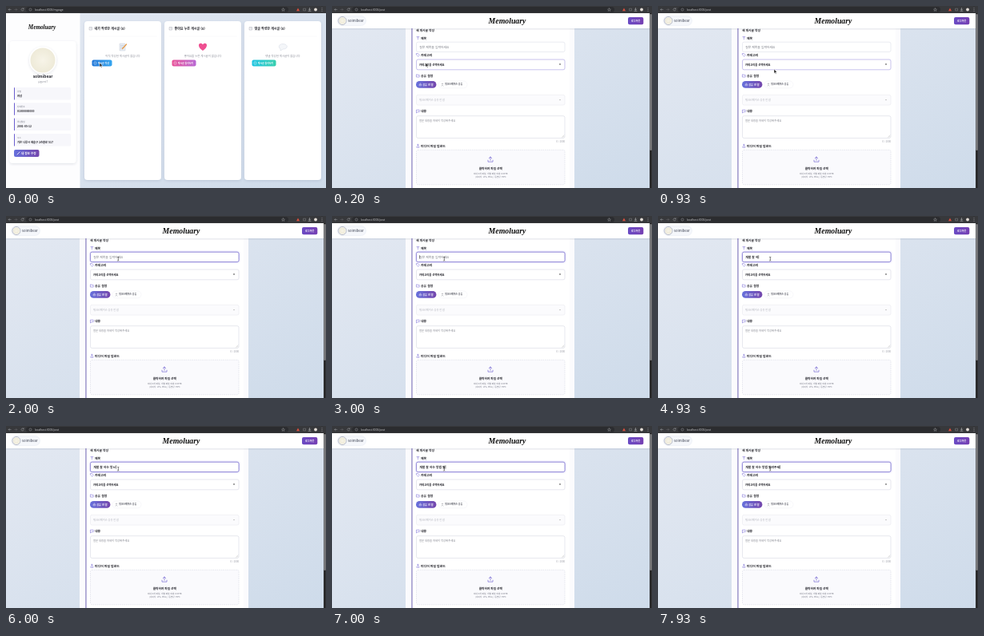
Recreate the animation shown at these times as an HTML page. Size 400x228 px, loop 8 s.

```html
<!DOCTYPE html>
<html lang="ko">
<head>
<meta charset="utf-8">
<title>새 게시글 작성</title>
<style>
  html, body { margin: 0; width: 100%; height: 100%; overflow: hidden; background: #fff; }
  svg { display: block; width: 100vw; height: 100vh; }
  text { font-family: "Noto Sans CJK KR", "Noto Sans CJK", "Noto Sans", sans-serif; white-space: pre; }
  .url { font-family: "Open Sans", "Noto Sans", sans-serif; }
  .brand { font-family: "Liberation Serif", serif; font-style: italic; }
</style>
</head>
<body>
<svg id="stage" viewBox="0 0 400 228" preserveAspectRatio="none">
  <defs>
    <linearGradient id="sky" x1="0" y1="0" x2="1" y2="1">
      <stop stop-color="#e4e9f2"/><stop offset=".5" stop-color="#d9e2ee"/><stop offset="1" stop-color="#cedbea"/>
    </linearGradient>
    <linearGradient id="violet"><stop stop-color="#6670dc"/><stop offset="1" stop-color="#7446ac"/></linearGradient>
    <linearGradient id="plum"><stop stop-color="#6a4bc4"/><stop offset="1" stop-color="#753fb2"/></linearGradient>
    <linearGradient id="blue"><stop stop-color="#2277d8"/><stop offset="1" stop-color="#36a5ef"/></linearGradient>
    <linearGradient id="pink"><stop stop-color="#e95298"/><stop offset="1" stop-color="#b869d4"/></linearGradient>
    <linearGradient id="teal"><stop stop-color="#20c5e3"/><stop offset="1" stop-color="#38cfae"/></linearGradient>
    <radialGradient id="photo"><stop stop-color="#f7f4e8"/><stop offset="1" stop-color="#eeead8"/></radialGradient>
    <filter id="soft" x="-10%" y="-10%" width="120%" height="120%">
      <feDropShadow dx="0" dy="1" stdDeviation="1.5" flood-color="#45506e" flood-opacity=".16"/>
    </filter>
  </defs>
  <g id="home"></g>
  <g id="post"></g>
  <g id="bar"></g>
  <path id="arrow" d="M0 0V5.4L1.3 4.3L2.1 6.2L3 5.8L2.2 4H3.8Z" fill="#222" stroke="#fff" stroke-width=".5"/>
  <path id="beam" d="M-1 -2.4Q0 -2.4 0 -1.8Q0 -2.4 1 -2.4M0 -1.8V1.8M-1 2.4Q0 2.4 0 1.8Q0 2.4 1 2.4" fill="none" stroke="#222" stroke-width=".6"/>
</svg>
<script>
const LOOP = 8000, OPEN = 70, FOCUS = 1430, TYPE = 3350;
const $ = id => document.getElementById(id);
const INK = '#202028', GREY = '#8b8d98', VIOLET = '#6c5fd0';

const rect = (x, y, w, h, fill, r = 0, extra = '') =>
  `<rect x="${x}" y="${y}" width="${w}" height="${h}" rx="${r}" fill="${fill}" ${extra}/>`;
const text = (s, x, y, size, fill = INK, weight = 400, extra = '') =>
  `<text x="${x}" y="${y + size * .36}" font-size="${size}" fill="${fill}" font-weight="${weight}" ${extra}>${s}</text>`;
const line = (d, stroke = VIOLET, w = .6) =>
  `<path d="${d}" fill="none" stroke="${stroke}" stroke-width="${w}" stroke-linecap="round" stroke-linejoin="round"/>`;
const dot = (x, y, r, fill, extra = '') => `<circle cx="${x}" cy="${y}" r="${r}" fill="${fill}" ${extra}/>`;
const MID = 'text-anchor="middle"';
const SHADOW = 'filter="url(#soft)"';
const edge = (color, w = .5) => `stroke="${color}" stroke-width="${w}"`;
const brand = (x, y, size) => text('Memoluary', x, y, size, '#111', 700, MID + ' class="brand"');

function drawBar() {
  $('bar').innerHTML =
    rect(0, 0, 400, 9, '#37383b') + rect(25, 1, 328, 7, '#2b2c2f', 3.5) +
    line('M6.2 4.5H3.2M4.5 3.2L3.2 4.5L4.5 5.8', '#a9abae', .45) +
    line('M10.8 4.5H13.8M12.5 3.2L13.8 4.5L12.5 5.8', '#6b6d71', .45) +
    line('M22 3.5A1.6 1.6 0 1 0 22.2 5M22.2 2.6V3.6H21.2', '#a9abae', .45) +
    dot(30.5, 4.5, 1.5, 'none', edge('#a9abae', .45)) +
    text('', 36, 4.4, 3.3, '#d0d1d4', 400, 'class="url" id="url"') +
    line('M346.5 2.8L347.1 4.1L348.5 4.2L347.4 5.1L347.8 6.4L346.5 5.7L345.2 6.4L345.6 5.1L344.5 4.2L345.9 4.1Z', '#a9abae', .4) +
    '<path d="M365 2.6L367 6.2H363Z" fill="#d8503f"/>' +
    line('M372 3.2H374.6V5.8H372Z', '#8f9195', .45) +
    line('M379.5 2.5V5M378.3 4L379.5 5.2L380.7 4M378 6.3H381', '#c9cacc', .5) +
    dot(387, 4.5, 1.9, '#e3dcd6') +
    [2.8, 4.5, 6.2].map(y => dot(395, y, .45, '#c9cacc')).join('');
}

function infoRow([label, value], i) {
  const y = 102 + i * 19.3;
  return rect(10, y, 71, 15.5, '#f7f7fb', 1.5) + rect(10, y, 1, 15.5, VIOLET, .5) +
    text(label, 14, y + 4.7, 2.6, '#777986', 500) + text(value, 14, y + 10.7, 3.3, INK, 600);
}

function listCard([title, empty, button, fill, w], i) {
  const x = 98 + i * 100;
  return rect(x, 19, 96, 199, '#fff', 4, SHADOW) +
    line(`M${x + 6.5} 26.5H${x + 9.5}V30H${x + 6.5}ZM${x + 7.3} 28H${x + 8.7}`, '#9a9cab', .45) +
    text(title + ' (0)', x + 12.5, 28.3, 4, INK, 700) +
    line(`M${x + 6} 38H${x + 90}`, '#ececf2', .4) +
    text(empty, x + 48, 62.6, 3.4, GREY, 400, MID) +
    rect(x + 9.5, 67.5, w, 8, fill, 2) +
    line(`M${x + 12.5} 70H${x + 14.8}V73H${x + 12.5}Z`, '#fff', .4) +
    text(button, x + 16.8, 71.5, 2.9, '#fff', 600);
}

function drawHome() {
  const rows = [['성별', '여성'], ['전화번호', '01000000000'], ['생년월일', '2001-05-12'],
    ['주소', '가온 나루시 해솔구 2순환로 517']];
  const cards = [
    ['내가 작성한 게시글', '아직 작성한 게시글이 없습니다', '게시글 작성', 'url(#blue)', 25],
    ['좋아요 누른 게시글', '좋아요를 누른 게시글이 없습니다', '게시글 둘러보기', 'url(#pink)', 30],
    ['댓글 작성한 게시글', '댓글 작성한 게시글이 없습니다', '게시글 둘러보기', 'url(#teal)', 30]];
  $('home').innerHTML = rect(0, 0, 400, 228, 'url(#sky)') + rect(0, 9, 92.5, 219, '#fdfdfe') +
    brand(45, 26, 7.2) +
    rect(4.5, 44, 83, 153, '#fff', 4, SHADOW) +
    dot(46, 68, 17, '#fff', SHADOW) + dot(46, 68, 15.5, 'url(#photo)') +
    text('solmibear', 46, 88.2, 5, INK, 700, MID) + text('@guest7', 46, 94.5, 3, GREY, 400, MID) +
    rows.map(infoRow).join('') +
    rect(10, 180, 31.5, 9, 'url(#violet)', 2) + line('M14 186L17 183', '#fff', .8) +
    text('내 정보 수정', 19, 184.5, 3.6, '#fff', 600) +
    cards.map(listCard).join('') +
    // memo, heart and speech bubble
    rect(142, 47, 7, 9, '#e9edf3', .6, edge('#b9c2cf', .4)) +
    line('M143.5 49.5H147.5M143.5 51.5H147.5M143.5 53.5H146', '#9cabc0', .4) +
    line('M145.5 53.5L150.5 48', '#e79a45', 1.2) +
    '<path d="M246 56C237 50 242 43.8 246 48.2C250 43.8 255 50 246 56Z" fill="#ef4f91"/>' +
    '<path d="M346 47.5C353 47.5 353 54 346.5 54L343 56V53.6C339.8 52 341 47.5 346 47.5Z" fill="#f4f6f9" stroke="#d3d9e2" stroke-width=".5"/>';
}

const field = (y, h, fill = '#fff', extra = '') => rect(105.5, y, 185.5, h, fill, 2, extra);
const label = (s, y, icon) => line(icon, VIOLET, .5) + text(s, 111, y, 3.9, INK, 700);
const chevron = (y, color) => `<path d="M283.8 ${y - .7}H286.2L285 ${y + .9}Z" fill="${color}"/>`;

function drawPost() {
  $('post').innerHTML = rect(0, 0, 400, 228, 'url(#sky)') +
    rect(92, 28, 211, 200, '#fbfbfd') +
    rect(99.5, 28, 197.5, 200, '#fff') + rect(99.4, 28, 1.1, 200, '#7a6fb8') +
    text('새 게시글 작성', 105, 30.6, 3.8, INK, 700) +
    label('제목', 40.2, 'M105.8 38.7H109M107.4 38.7V41.8') +
    field(45.2, 12.3, '#fff', 'id="titleBox"') +
    text('', 109.3, 51.4, 3.8, INK, 400, 'id="title"') + rect(0, 49.2, .5, 4.4, '#111', 0, 'id="caret"') +
    label('카테고리', 61.2, 'M105.7 59.6H107.5L109.4 61.5L107.7 63.2L105.7 61.3Z') +
    field(67, 12.8, '#fff', 'id="select"') + text('카테고리를 선택하세요', 109, 73.3, 3.35, INK, 700) + chevron(73.2, '#333') +
    label('공유 설정', 87.4, 'M105.8 85.9H107L107.5 86.5H109.2V89H105.8Z') +
    rect(105, 94, 25.4, 8.8, 'url(#violet)', 4.4) +
    line('M109.4 98.2H111.6V99.8H109.4ZM109.9 98.2V97.4Q110.5 96.4 111.1 97.4V98.2', '#fff', .4) +
    text('공유 안 함', 113.2, 98.4, 3.2, '#fff', 700) +
    rect(133, 94, 36, 8.8, '#fff', 4.4, edge('#ecedf3', .45)) +
    dot(138, 97.5, .7, 'none', edge('#777986', .4)) + line('M136.8 100Q138 98.3 139.2 100', '#777986', .4) +
    text('워크스페이스 공유', 141, 98.4, 2.9, '#50525e', 600) +
    field(111.3, 12.8, '#fbfbfd', edge('#e4e5ed')) + text('워크스페이스 공유 안 함', 109, 117.6, 3.2, '#aeb0ba', 500) + chevron(117.6, '#bbb') +
    label('내용', 131.8, 'M105.8 130.2H109.2V132.7H107.2L105.8 133.8Z') +
    field(137.7, 27.8, '#fff', edge('#cfd1dc')) + text('질문 내용을 자세히 작성해주세요', 109, 144.3, 3.3, '#83858f', 500) +
    line('M287.5 164.3L289.9 161.9M289 164.3L289.9 163.4', '#999', .35) +
    text('0 / 1000', 291, 170.2, 2.8, GREY, 400, 'text-anchor="end"') +
    label('미디어 파일 업로드', 175.4, 'M107.4 176V173.3M106.3 174.3L107.4 173.3L108.5 174.3M105.8 176.2V177.2H109V176.2') +
    field(180.3, 43.5, '#fafafd', edge('#cfd1df') + ' stroke-dasharray="1.6 1"') +
    line('M198 193.3V189M196.2 190.8L198 189L199.8 190.8M195 193.2V195.2H201V193.2', VIOLET, .65) +
    text('클릭하여 파일 선택', 198.3, 203.7, 3.7, INK, 700, MID) +
    text('최대 5개 파일, 개별 파일 최대 100MB', 198.3, 210.4, 2.7, '#777986', 400, MID) +
    text('(이미지: JPG, PNG) / 동영상: MP4', 198.3, 214.2, 2.6, '#777986', 400, MID) +
    rect(0, 9, 400, 19, '#fff', 0, SHADOW) + brand(205.2 + 13.8, 18.6, 9.8) +
    rect(6.5, 12.5, 36, 12, '#f5f7fb', 6, edge('#e1e6f0', .4)) +
    dot(13, 18.5, 5, '#fff', edge('#7d8296', .55)) + dot(13, 18.5, 3.9, 'url(#photo)') +
    text('solmibear', 20, 18.5, 4.2, '#3b4050', 500) +
    rect(370, 14, 19.3, 9.2, 'url(#plum)', 2) + text('로그아웃', 379.7, 18.5, 3.1, '#fff', 700, MID) +
    rect(397, 9, 3, 219, '#2c2c2e') + rect(397.4, 10, 2.2, 171, '#8b8c8f', 1.1);
}

// Hangul typed key by key, as an input method composes it
const LEAD = 'ㄱㄲㄴㄷㄸㄹㅁㅂㅃㅅㅆㅇㅈㅉㅊㅋㅌㅍㅎ';
const TAIL = ' ㄱㄲㄳㄴㄵㄶㄷㄹㄺㄻㄼㄽㄾㄿㅀㅁㅂㅄㅅㅆㅇㅈㅊㅋㅌㅍㅎ';
const PHRASE = '개발 잘 하는 방법 알려주세';

function typed(keys) {
  let out = '';
  for (const ch of PHRASE) {
    if (keys <= 0) break;
    const code = ch.charCodeAt(0) - 0xac00;
    if (code < 0) { out += ch; keys--; continue; }
    const tail = code % 28, need = tail ? 3 : 2;
    if (keys >= need) out += ch;
    else if (keys === 2) out += String.fromCharCode(0xac00 + code - tail);
    else {
      const lead = LEAD[Math.floor(code / 588)];
      const prev = out.charCodeAt(out.length - 1);
      if (prev >= 0xac00 && (prev - 0xac00) % 28 === 0)
        out = out.slice(0, -1) + String.fromCharCode(prev + TAIL.indexOf(lead));
      else out += lead;
    }
    keys -= need;
  }
  return out;
}

function keyCount(t) {
  if (t < TYPE) return 0;
  return t < 6020 ? 1 + Math.floor((t - TYPE) * .0075) : 20 + Math.floor((t - 6000) * .0063);
}

const ease = (t, a, b) => {
  const p = Math.min(1, Math.max(0, (t - a) / (b - a)));
  return p * p * (3 - 2 * p);
};

function render(t) {
  const post = t >= OPEN, focus = t >= FOCUS;
  $('home').style.display = post ? 'none' : '';
  $('post').style.display = post ? '' : 'none';
  $('url').textContent = 'localhost:3000/' + (post ? 'post' : 'mypage');

  const out = ease(t, 220, 850), up = ease(t, 980, 1400);
  const x = 117 + 28 * out - 4.7 * up, y = 71 + 8 * out - 25.3 * up;
  const beam = post && y < 57.5;
  $('arrow').style.display = beam ? 'none' : '';
  $('beam').style.display = beam ? '' : 'none';
  $(beam ? 'beam' : 'arrow').setAttribute('transform', `translate(${x} ${y})`);

  const box = $('titleBox');
  box.setAttribute('stroke', focus ? '#756acb' : '#d6d8e4');
  box.setAttribute('stroke-width', focus ? .7 : .5);
  box.style.filter = focus ? 'drop-shadow(0 0 .8px #b3aaf0)' : '';
  const hover = y > 67 && y < 80;
  $('select').setAttribute('stroke', hover ? '#9a91df' : '#d3d4e2');
  $('select').setAttribute('stroke-width', .55);

  const n = keyCount(t), title = $('title');
  title.textContent = n ? typed(n) : '질문 제목을 입력하세요';
  title.setAttribute('fill', n ? INK : '#777982');
  title.setAttribute('font-weight', n ? 700 : 400);
  const width = n && post ? title.getComputedTextLength() : 0;
  $('caret').setAttribute('x', 109.5 + width);
  $('caret').style.display = focus && (n || (t - FOCUS) % 1060 < 530) ? '' : 'none';
}

drawBar();
drawHome();
drawPost();
const start = performance.now();
function tick() {
  render((performance.now() - start) % LOOP);
  requestAnimationFrame(tick);
}
render(0);
requestAnimationFrame(tick);
</script>
</body>
</html>
```
